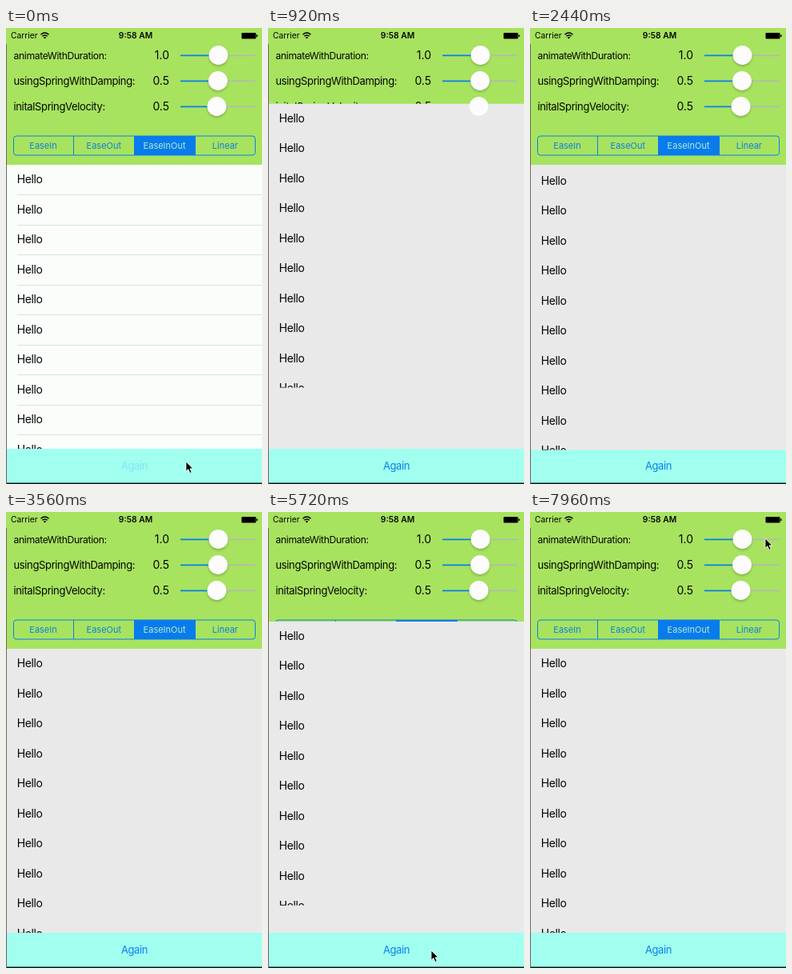
An HTML page for the animation above (8000 ms loop, 320 by 570 pixels).

```html
<!DOCTYPE html>
<html lang="en">
<head>
<meta charset="utf-8">
<title>Spring table</title>
<style>
  html, body { margin: 0; width: 100%; height: 100%; overflow: hidden; background: #e9e9e9; }
  svg { display: block; }
  #stage { width: 100vw; height: 100vh; }
  text { font-family: Inter, Roboto, sans-serif; fill: #050505; }
  .label { font-size: 13px; letter-spacing: -.36px; }
  .row { font-size: 14px; letter-spacing: -.4px; }
  .value { font-size: 14px; text-anchor: end; }
  .status { font-size: 10.3px; }
  .clock { font-weight: 600; text-anchor: middle; }
  .segment { font-size: 11px; text-anchor: middle; fill: #0b7fe8; }
  .segment.on { fill: #b4ecd0; }
  .shadow { filter: drop-shadow(0 2px 1.5px rgba(0, 0, 0, .22)); }
  #again { font-size: 13px; letter-spacing: -.4px; text-anchor: middle; fill: #087fec; }
  circle { fill: #fcfcfc; }
</style>
</head>
<body>
<svg id="stage" viewBox="0 0 320 570" preserveAspectRatio="none">
  <rect width="320" height="570" fill="#e9e9e9"/>
  <rect width="320" height="171" fill="#a7e35f"/>

  <text class="status" x="6" y="13.4">Carrier</text>
  <g fill="none" stroke="#000" stroke-width="1.5">
    <path d="M43.5 8.2Q48.5 3.8 53.5 8.2M45.3 10.3Q48.5 7.6 51.7 10.3"/>
    <path d="M48.5 13.6L46.7 11.7Q48.5 10.4 50.3 11.7Z" fill="#000" stroke="none"/>
  </g>
  <text class="status clock" x="162" y="13.4">9:58 AM</text>
  <rect x="294.5" y="6" width="18" height="7.5" rx="1.3"/>
  <rect x="313" y="8.3" width="1.5" height="3" rx=".7"/>

  <g id="sliders"></g>
  <g id="segments">
    <rect x="160" y="135" width="77" height="24" fill="#087bed"/>
    <path d="M84.5 135v24" stroke="#0b7fe8"/>
    <rect x="9.5" y="135" width="302" height="24" rx="3.5" fill="none" stroke="#0b7fe8"/>
  </g>

  <rect y="526" width="320" height="44" fill="#a1fff0"/>
  <text id="again" x="160.5" y="552">Again</text>

  <svg id="table" y="171" width="320" height="355" overflow="hidden">
    <rect id="sheet" width="320" height="355"/>
    <g id="lines" stroke="#e6dfdd"></g>
    <g id="rows"></g>
  </svg>

  <g id="knobs"></g>
  <rect y="568.5" width="320" height="1.5" fill="#0c1211"/>
  <rect y="20" width="1" height="550" fill="#6d6663"/>
  <path id="cursor" d="M0 0V12.2L2.8 9.6L5 14.4L7.2 13.4L5 8.8H8.8Z" stroke="#fff" stroke-width=".8"/>
</svg>
<script>
  const NS = 'http://www.w3.org/2000/svg';
  const $ = id => document.getElementById(id);

  function add(parent, tag, attrs, text = '') {
    const el = document.createElementNS(NS, tag);
    for (const name in attrs) el.setAttribute(name, attrs[name]);
    el.textContent = text;
    $(parent).append(el);
    return el;
  }

  [
    ['animateWithDuration:', '1.0', 34, 265.5, 12.2],
    ['usingSpringWithDamping:', '0.5', 66, 265, 13],
    ['initalSpringVelocity:', '0.5', 98, 263.5, 13]
  ].forEach(([name, value, y, knob, size]) => {
    const disc = { cx: knob, cy: y, r: 11.8 };
    add('sliders', 'text', { class: 'label', x: 9.5, y: y + 4.5, style: `font-size:${size}px` }, name);
    add('sliders', 'text', { class: 'value', x: 204, y: y + 5 }, value);
    add('sliders', 'path', { d: `M${knob} ${y + .3}H312`, stroke: '#b3bbae', 'stroke-width': 1.8 });
    add('sliders', 'path', { d: `M218 ${y + .3}H${knob}`, stroke: '#087fec', 'stroke-width': 1.8 });
    add('sliders', 'circle', { ...disc, class: 'shadow' });
    // The white discs stay visible while the table passes over their shadows.
    add('knobs', 'circle', disc);
  });

  ['EaseIn', 'EaseOut', 'EaseInOut', 'Linear'].forEach((name, i) =>
    add('segments', 'text', { class: i === 2 ? 'segment on' : 'segment', x: 46.5 + i * 75.8, y: 151 }, name));

  for (let i = 0; i < 10; i++) {
    add('rows', 'text', { class: 'row', x: 13.8, y: 23.2 + i * 37.5 }, 'Hello');
    add('lines', 'path', { d: `M14 ${Math.floor(37.5 * (i + 1)) + .5}H320` });
  }

  const LOOP = 8000, TRAVEL = 570, PERIOD = 1750, DAMPING = .5;
  const REST = PERIOD * 4 / 3;
  const taps = [178, 5083];

  // Offset of an underdamped spring, at rest from its third zero crossing on.
  function spring(ms) {
    if (ms > REST) return 0;
    const phase = ms / PERIOD * 2 * Math.PI;
    const decay = DAMPING / Math.sqrt(1 - DAMPING * DAMPING);
    return TRAVEL * Math.exp(-decay * phase) * (Math.cos(phase) + decay * Math.sin(phase));
  }

  const clamp = v => Math.min(1, Math.max(0, v));
  const smooth = v => v * v * (3 - 2 * v);

  const pointer = [
    [0, 225, 542], [200, 225, 542], [750, 330, 556], [4250, 330, 556],
    [4800, 204, 548], [6750, 204, 548], [7700, 294, 33], [LOOP, 294, 33]
  ];

  function pointerAt(t) {
    const i = pointer.findIndex(p => p[0] > t);
    const [t0, x0, y0] = pointer[i - 1], [t1, x1, y1] = pointer[i];
    const k = smooth((t - t0) / (t1 - t0));
    return [x0 + (x1 - x0) * k, y0 + (y1 - y0) * k];
  }

  function labelOpacity(t) {
    const tap = t < 4900 ? taps[0] : taps[1];
    return .2 + .8 * clamp((t - tap) / 350);
  }

  function draw(now) {
    const t = now % LOOP;
    const start = taps.filter(tap => tap <= t).pop();
    const fresh = start === undefined;
    const offset = fresh ? 0 : spring(t - start);
    $('table').setAttribute('y', 171 + offset);
    $('sheet').setAttribute('fill', fresh ? '#fafefb' : '#e9e9e9');
    $('lines').style.display = fresh ? '' : 'none';
    $('again').style.opacity = labelOpacity(t);
    $('cursor').setAttribute('transform', `translate(${pointerAt(t)})`);
  }

  const origin = performance.now();
  function tick() {
    draw(performance.now() - origin);
    requestAnimationFrame(tick);
  }
  tick();
</script>
</body>
</html>
```
